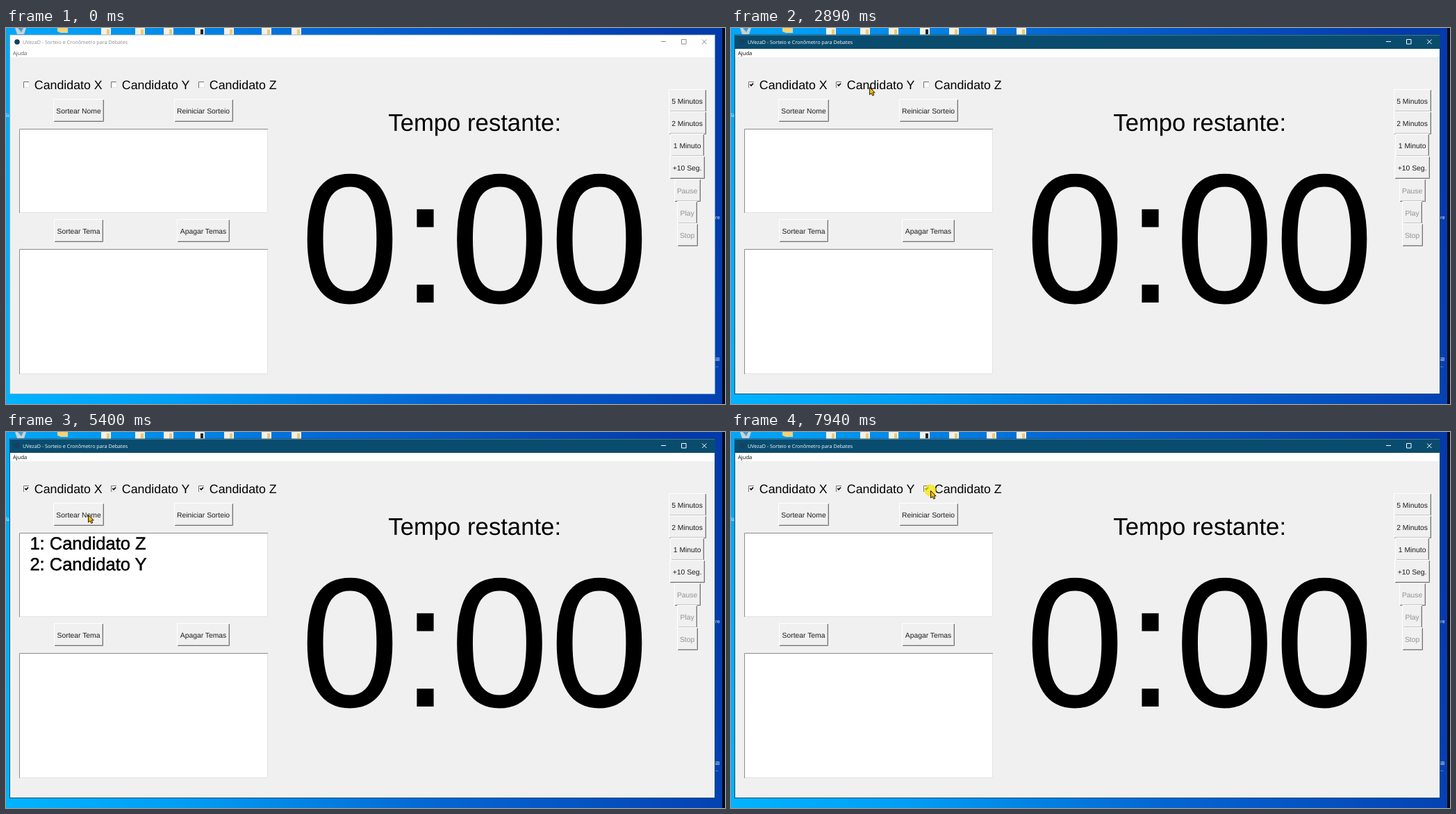
These frames come from a looping animation (1035 px wide and 541 px high, 8 s). An HTML page:

```html
<!DOCTYPE html>
<html lang="pt">
<head>
<meta charset="utf-8">
<title>Sorteio e Cronômetro</title>
<style>
html, body { margin: 0; width: 100%; height: 100%; overflow: hidden; background: #0467d4; }
svg { display: block; width: 100vw; height: 100vh; }
text { font-family: "Liberation Sans", Arial, sans-serif; text-rendering: geometricPrecision; white-space: pre; }
.ui { font-family: "Open Sans", "Noto Sans", sans-serif; }
.mid { text-anchor: middle; }
</style>
</head>
<body>
<svg viewBox="0 0 1035 541" preserveAspectRatio="none">
  <defs>
    <linearGradient id="sky" gradientUnits="userSpaceOnUse" x1="0" y1="541" x2="1035" y2="250">
      <stop offset="0" stop-color="#00b4ff"/>
      <stop offset=".22" stop-color="#009ff5"/>
      <stop offset=".55" stop-color="#0467d4"/>
      <stop offset="1" stop-color="#053aab"/>
    </linearGradient>
  </defs>
  <rect width="1035" height="541" fill="url(#sky)"/>
  <rect x="1031" width="4" height="541" fill="#020a18"/>
  <g id="desk"></g>
  <g id="win"></g>
  <g id="pointer">
    <circle id="glow" r="8.5" fill="#f7e600" opacity=".72"/>
    <path d="M.5 .5V11L3 8.8 4.8 12.4 6.8 11.4 5 8H8.2Z" fill="#f5b816" stroke="#2a1c00"/>
  </g>
</svg>
<script>
const NS = 'http://www.w3.org/2000/svg';
const $ = id => document.getElementById(id);
const desk = $('desk'), win = $('win'), pointer = $('pointer'), glow = $('glow');

function add(parent, tag, attrs, label) {
  const el = document.createElementNS(NS, tag);
  for (const k in attrs) el.setAttribute(k, attrs[k]);
  if (label) el.textContent = label;
  parent.appendChild(el);
  return el;
}
const rect = (p, x, y, width, height, fill) => add(p, 'rect', { x, y, width, height, fill });
const line = (p, d, stroke, w = 1) => add(p, 'path', { d, stroke, fill: 'none', 'stroke-width': w });
const text = (p, s, x, y, size, more) => add(p, 'text', { x, y, 'font-size': size, ...more }, s);

// Desktop peeking out around the window
add(desk, 'path', { d: 'M13 0H29L26 9H16Z', fill: '#c3d3dc' });
add(desk, 'path', { d: 'M17 0H25L22 6Z', fill: '#4d9ac6' });
add(desk, 'path', { d: 'M74 0H89V7H79L74 5Z', fill: '#f3d27a' });
[144, 193, 234, 279, 321, 375, 418].forEach((x, i) => {
  rect(desk, x - 7, 0, 14, 10, '#f4f1e6');
  rect(desk, x + 1, 2, 4, 7, i === 3 ? '#20242c' : '#ecc974');
});
const tag = { fill: '#fff', class: 'ui' };
text(desk, 'Sc', -1, 128, 7, tag);
text(desk, 're', 1021, 275, 7, tag);
text(desk, 'SB', 1019, 479, 7, tag);
text(desk, '...', 1020, 488, 7, tag);

// Window frame
const frame = rect(win, 5.5, 10, 1015, 516.5, '#f0f0f0');
const bar = rect(win, 6, 10.5, 1014, 19.5, '#fff');
rect(win, 6, 30, 1014, 12, '#fff');
add(win, 'circle', { cx: 16, cy: 20, r: 3.8, fill: '#173f61' });
const title = text(win, 'UVezaD - Sorteio e Cronômetro para Debates', 24, 22.6, 7.2, { class: 'ui' });
const menu = text(win, 'Ajuda', 10, 39, 7.6, { class: 'ui' });
const controls = line(win, 'M943 19.5H950M972.5 16.5H979V23H972.5ZM1002 16.5L1008.5 23M1008.5 16.5L1002 23');

// Candidates
const ticks = ['X', 'Y', 'Z'].map((c, i) => {
  const x = 25 + 126 * i;
  rect(win, x, 77, 9, 9, '#fff');
  line(win, `M${x + .5} 86V77.5H${x + 8}`, '#707070');
  line(win, `M${x + 1} 85.5H${x + 8.5}V78`, '#e3e3e3');
  text(win, 'Candidato ' + c, x + 15.8, 88, 17.8);
  return line(win, `M${x + 2.3} 81L${x + 4} 83 ${x + 7} 79.6`, '#000', 1.6);
});

// Raised button as wide as its label; returns a function that presses it
function button(label, cx, y, off) {
  const g = add(win, 'g', {});
  const cap = text(g, label, cx, y + 20.6, 10.35, { class: 'mid', fill: off ? '#929292' : '#1c1c1c' });
  const w = Math.round(cap.getComputedTextLength() + 9), h = 33;
  const x = Math.round(cx - w / 2), r = x + w, b = y + h;
  const lit = line(g, `M${x + .5} ${b}V${y + .5}H${r}`);
  const dark = line(g, `M${x + 1} ${b - .5}H${r - .5}V${y + 1}`);
  const soft = line(g, `M${x + 2} ${b - 1.5}H${r - 1.5}V${y + 2}`);
  const press = down => {
    lit.setAttribute('stroke', down ? '#757575' : '#fff');
    dark.setAttribute('stroke', down ? '#fff' : '#757575');
    soft.setAttribute('stroke', down ? '#e6e6e6' : '#c4c4c4');
    cap.setAttribute('transform', down ? 'translate(1 1)' : '');
  };
  press(false);
  return press;
}
const drawName = button('Sortear Nome', 104.5, 102);
const reset = button('Reiniciar Sorteio', 284, 102);
button('Sortear Tema', 104.5, 275);
button('Apagar Temas', 284, 275);
['5 Minutos', '2 Minutos', '1 Minuto', '+10 Seg.', 'Pause', 'Play', 'Stop'].forEach((label, i) =>
  button(label, 980.6, Math.round(87.5 + 32.3 * i), i > 3));

function listBox(y, h) {
  rect(win, 19, y, 358, h, '#fff');
  line(win, `M19.5 ${y + h}V${y + .5}H377`, '#8c8c8c');
  line(win, `M20 ${y + h - .5}H376.5V${y + 1}`, '#e3e3e3');
}
listBox(145, 121);
listBox(318, 180);
const drawn = ['Z', 'Y', 'X'].map((c, i) =>
  text(win, `${i + 1}: Candidato ${c}`, 34.4, 169 + 29.6 * i, 25.5, { stroke: '#000', 'stroke-width': .5 }));

// Timer; the zeros stand a little taller than the colon's font size
text(win, 'Tempo restante:', 550.3, 148.3, 34.7);
[495, 710.5, 854].forEach(x =>
  text(win, '0', 0, 0, 256.5, { class: 'mid', transform: `translate(${x} 395) scale(1 1.035)` }));
text(win, ':', 603.5, 395, 254, { class: 'mid' });

// Pointer glides, in ticks: [start, end, x, y]
const TICK = 67.5, START = 366, LOOP = 8000, HOLD = 2;
const home = [945, 521];
const glides = [
  [0, 11, 131, 153], [11, 17, 91, 79],      // to candidate X
  [20, 28, 187, 82], [29, 31, 199, 85],     // to candidate Y
  [37, 43, 154, 109], [44, 51, 288, 78],    // to candidate Z
  [55, 60, 129, 128], [60, 62, 118, 119],   // to the draw button
  [90, 94, 205, 129], [94, 96, 284, 124],   // to the reset button
  [104, 110, 287, 84]                       // back to candidate Z
];
// Ticks at which the mouse button is let go
const checks = [20, 34, 54], draws = [65, 74, 90], clear = 104, last = 114;
const releases = [...checks, ...draws, clear, last];

const ease = u => u * u * (3 - 2 * u);
const held = (k, at) => k >= at - HOLD && k < at;
const show = (el, on) => el.setAttribute('visibility', on ? 'inherit' : 'hidden');

function pose(k) {
  let [x, y] = home;
  for (const [a, b, tx, ty] of glides) {
    const u = ease(Math.min(1, Math.max(0, (k - a) / (b - a))));
    x += (tx - x) * u;
    y += (ty - y) * u;
  }
  return [Math.round(x), Math.round(y)];
}

function render(t) {
  const k = Math.floor((t - START) / TICK);
  const active = k >= checks[0] - HOLD;
  bar.setAttribute('fill', active ? '#0a4c6e' : '#fff');
  frame.setAttribute('stroke', active ? '#0a4c6e' : '#7fa6c8');
  title.setAttribute('fill', active ? '#fff' : '#8c8c8c');
  menu.setAttribute('fill', active ? '#000' : '#555');
  controls.setAttribute('stroke', active ? '#fff' : '#8c8c8c');

  ticks.forEach((el, i) => show(el, k >= checks[i]));
  drawn.forEach((el, i) => show(el, k >= draws[i] && k < clear));
  drawName(draws.some(at => held(k, at)));
  reset(held(k, clear));

  show(pointer, k >= 0);
  pointer.setAttribute('transform', `translate(${pose(k)})`);
  show(glow, releases.some(at => held(k, at)));
}

function loop() {
  render(performance.now() % LOOP);
  requestAnimationFrame(loop);
}
loop();
</script>
</body>
</html>
```
